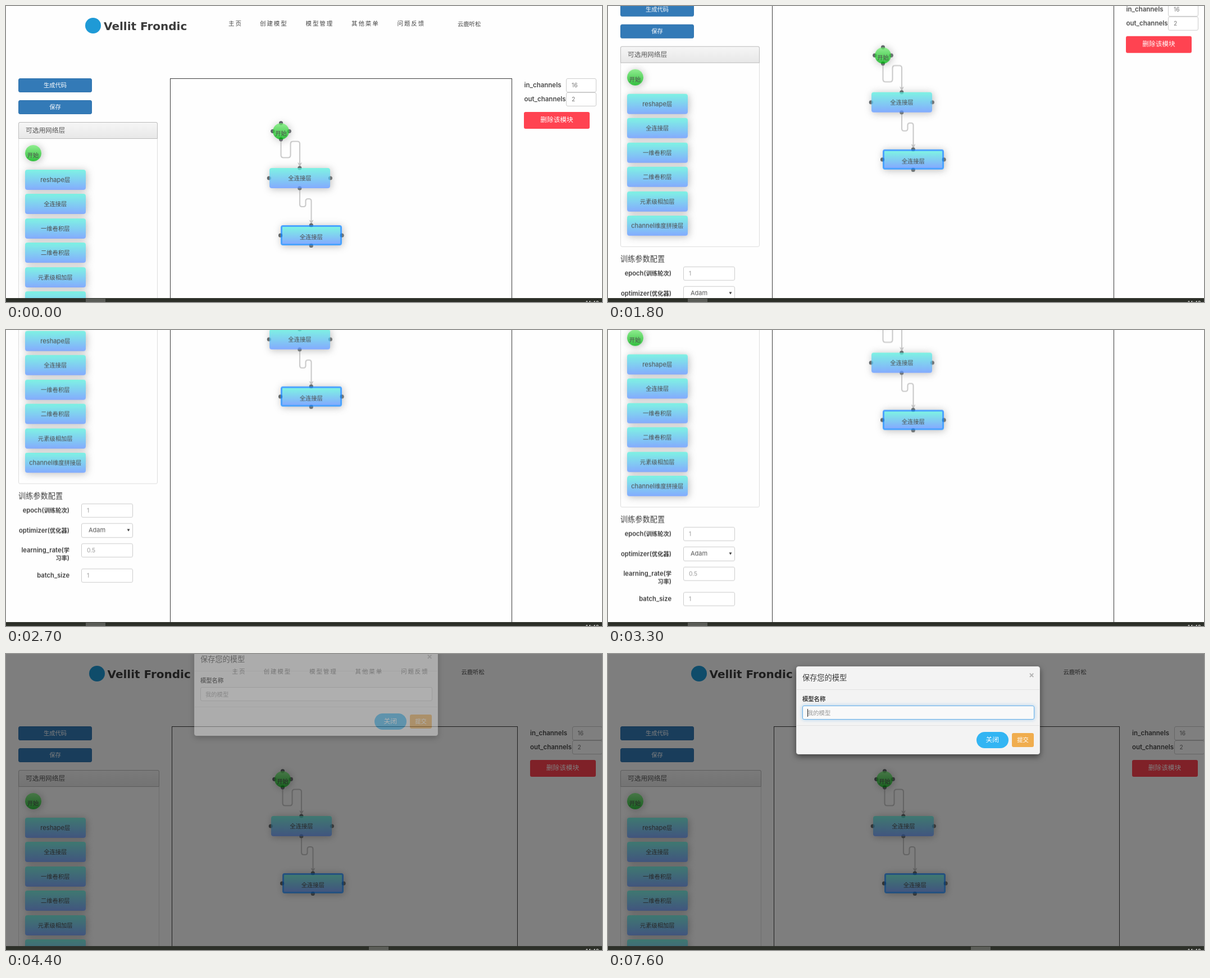
An HTML page for the animation above (8000 ms loop, 1061x528 px).

```html
<!DOCTYPE html>
<html lang="zh">
<head>
<meta charset="utf-8">
<title>Model editor</title>
<style>
html, body { margin: 0; width: 100%; height: 100%; overflow: hidden; background: #fdfdfd; }
#stage {
  --o: 0;
  position: absolute; left: 0; top: 0; width: 1061px; height: 528px; overflow: hidden;
  background: #fefefe; color: #3c3c3c;
  font: 10.3px/20px Inter, "Noto Sans CJK SC", "Noto Sans CJK", sans-serif;
}
#stage div, #stage svg { position: absolute; box-sizing: border-box; white-space: nowrap; }
i { font-style: normal; font-size: 11.2px; }
#stage, #page, #save, #shade, #modal, #name, #hint, #c1, #c2, #one, #two, #tab {
  animation: 8s step-end infinite;
}

/* page */
#stage { animation-name: reflow; }
#page { left: 0; top: 0; width: 1061px; height: 1000px; animation-name: scroll; }
#head { left: calc(var(--o) * 6.5px); top: 0; color: #484848; }
#brand { left: 174px; top: 26px; color: #3c3c3c; font: 900 20px/20px "DejaVu Sans", sans-serif; }
#logo { left: 141px; top: 21px; width: 28px; height: 28px; border-radius: 50%; background: #1f9ad6; }
.nav { top: 22px; font-size: 10.5px; letter-spacing: 1.9px; }
.btn { color: #fff; text-align: center; border-radius: 3px; }
.blue { left: 22px; width: 131px; height: 25px; line-height: 23px; background: #337ab7; border: 1px solid #3173ad; }
#save { top: 168px; animation-name: press; }
#panel { left: 22px; top: 207px; width: calc(248px + var(--o) * 3px); height: 357.5px; border: 1px solid #ddd; border-radius: 3px; }
#panel div {
  left: -1px; top: -1px; width: calc(100% + 2px); height: 30px; padding-left: 12px;
  font-size: 11.7px; line-height: 29px; color: #5a5a5a;
  background: linear-gradient(#f6f6f6, #e8e8e8); border: 1px solid #bbb; border-radius: 3px 3px 0 0;
}
.node, .start { text-align: center; opacity: .8; color: #222; box-shadow: 1.5px 1.5px 14px #aaa; }
.node {
  width: 108.5px; height: 36px; line-height: 36px; border-radius: 4px;
  background: linear-gradient(#5ff0dd, #6597ff);
}
.start {
  width: 29px; height: 29px; line-height: 37px; border-radius: 50%;
  background: linear-gradient(#74ea74, #00b010);
}
.left { left: 33.5px; }
.picked { border: 3.5px solid #1e8cff; line-height: 36px; }
#board { left: calc(292px + var(--o) * 3px); top: 128.5px; width: calc(609px + var(--o) * 7px); height: 900px; border: 1px solid #3c3c3c; }
#graph { left: calc(var(--o) * 3px); top: 0; }
#side { left: calc(var(--o) * 10.5px); top: 0; }
.lab { font-weight: 600; font-size: 11.2px; }
.lab span { font-size: 10.3px; }
.form { right: 948px; text-align: right; }
.side { left: 922.5px; font-size: 11.5px; color: #4a4a4a; }
.in {
  left: 134px; width: 91.5px; height: 25.5px; padding-left: 9px; line-height: 23.5px;
  color: #999; background: #fff; border: 1px solid #ccc; border-radius: 3px;
}
.num { left: 997px; width: 54px; color: #777; }
#del { left: 922px; top: 189px; width: 117px; height: 29.5px; line-height: 29.5px; font-size: 11.7px; background: #ff4351; }

/* dialog */
#shade { left: 0; top: 0; width: 1061px; height: 528px; background: #000; opacity: 0; animation-name: shade; }
#modal {
  left: 334.5px; top: 21.5px; width: 434.5px; height: 157.5px; opacity: 0; background: #f3f3f3;
  border: 1px solid #e2e2e2; border-radius: 4px; box-shadow: 0 4px 11px rgba(0,0,0,.5); animation-name: drop;
}
.rule { left: 0; width: 100%; height: 1px; background: #e2e2e2; }
#name {
  left: 10px; top: 69.5px; width: 413px; height: 25px; background: #f9f9f9;
  border: 1px solid #ccc; border-radius: 3px; animation-name: focus;
}
#hint { left: 8.5px; top: 1.5px; color: #999; animation-name: hint; }
.caret { top: 4.5px; width: 1px; height: 14px; background: #222; opacity: 0; }
#c1 { left: 8.5px; animation-name: caret1; }
#c2 { left: 16.5px; animation-name: caret2; }
.key { top: 1.5px; color: #555; opacity: 0; font-family: Roboto, sans-serif; font-size: 10.5px; }
#one { left: 6.5px; animation-name: one; }
#two { left: 10.7px; animation-name: two; }

/* task bar */
#bar { left: 0; top: 521px; width: 1061px; height: 7px; overflow: hidden; background: #2d3029; }
#tab { left: 0; top: 1px; width: 35px; height: 6px; background: #5b5d58; transform: translateX(141.5px); animation-name: tab; }
#clock { left: 1032px; top: 4px; color: #fff; font-size: 9px; line-height: 10px; }

@keyframes scroll {
  0% { transform: translateY(0); }
  10% { transform: translateY(-48px); }
  11.25% { transform: translateY(-72.6px); }
  15% { transform: translateY(-80px); }
  16.25% { transform: translateY(-122px); }
  17.5% { transform: translateY(-145.2px); }
  22.5% { transform: translateY(-135.3px); }
  23.75% { transform: translateY(-75px); }
  25% { transform: translateY(-26px); }
  26.25% { transform: translateY(-8px); }
  27.5% { transform: translateY(-68px); }
  28.75% { transform: translateY(-145.2px); }
  31.25% { transform: translateY(-180px); }
  32.5% { transform: translateY(-255px); }
  33.75% { transform: translateY(-290.4px); }
  36.25% { transform: translateY(-312px); }
  37.5% { transform: translateY(-345px); }
  38.75% { transform: translateY(-360px); }
  40% { transform: translateY(-325px); }
  41.25% { transform: translateY(-248.6px); }
  42.5% { transform: translateY(-165px); }
  43.75% { transform: translateY(-80px); }
  45% { transform: translateY(-20px); }
  46.25%, 100% { transform: translateY(0); }
}
@keyframes reflow { 0% { --o: 0; } 53.75%, 100% { --o: 1; } }
@keyframes press {
  0% { background: #337ab7; border-color: #3173ad; }
  48.75% { background: #286090; border-color: #204d74; }
  51.25% { background: #204d74; border-color: #2c66a4; }
  53.75%, 100% { background: #337ab7; border-color: #3173ad; }
}
@keyframes tab { 0% { transform: translateX(141.5px); } 51.25%, 100% { transform: translateX(646px); } }
@keyframes shade { 0% { opacity: 0; } 53.75% { opacity: .25; } 55%, 100% { opacity: .5; } }
@keyframes drop {
  0% { opacity: 0; transform: translateY(-39px); }
  55% { opacity: .4; transform: translateY(-33px); }
  56.25% { opacity: 1; transform: translateY(-18px); }
  57.5% { opacity: 1; transform: translateY(-5px); }
  58.75%, 100% { opacity: 1; transform: none; }
}
@keyframes focus {
  0% { border-color: #ccc; box-shadow: none; }
  66.25% { border-color: #aec4d4; box-shadow: 0 0 2px rgba(102,175,233,.3); }
  67.5%, 100% { border-color: #66afe9; box-shadow: 0 0 6px rgba(102,175,233,.6); }
}
@keyframes hint { 0% { opacity: 1; } 80% { opacity: 0; } 95%, 100% { opacity: 1; } }
@keyframes caret1 {
  0% { opacity: 0; } 66.25% { opacity: 1; } 72.5% { opacity: 0; }
  78.75% { opacity: 1; } 80% { opacity: 0; } 95%, 100% { opacity: 1; }
}
@keyframes caret2 { 0% { opacity: 0; } 83.75% { opacity: 1; } 88.75%, 100% { opacity: 0; } }
@keyframes one { 0% { opacity: 0; } 80% { opacity: 1; } 95%, 100% { opacity: 0; } }
@keyframes two { 0% { opacity: 0; } 83.75% { opacity: 1; } 92.5%, 100% { opacity: 0; } }
</style>
</head>
<body>
<div id="stage">
  <div id="page">
    <div id="head">
      <div id="logo"></div>
      <div id="brand">Vellit Frondic</div>
      <div class="nav" style="left:396px">主页</div>
      <div class="nav" style="left:452px">创建模型</div>
      <div class="nav" style="left:533.5px">模型管理</div>
      <div class="nav" style="left:615px">其他菜单</div>
      <div class="nav" style="left:696.5px">问题反馈</div>
      <div class="nav" style="left:804px;font-size:10.3px;letter-spacing:0">云鹿听松</div>
    </div>

    <div class="btn blue" style="top:129px">生成代码</div>
    <div class="btn blue" id="save">保存</div>
    <div id="panel"><div>可选用网络层</div></div>
    <div class="start left" style="top:248px">开始</div>
    <div class="node left" style="top:291.5px"><i>reshape</i>层</div>
    <div class="node left" style="top:335px">全连接层</div>
    <div class="node left" style="top:378.6px">一维卷积层</div>
    <div class="node left" style="top:422.2px">二维卷积层</div>
    <div class="node left" style="top:465.7px">元素级相加层</div>
    <div class="node left" style="top:509.3px"><i>channel</i>维度拼接层</div>

    <div style="left:22px;top:576px;font-size:13.2px">训练参数配置</div>
    <div class="lab form" style="top:602px">epoch(<span>训练轮次</span>)</div>
    <div class="in" style="top:599.8px">1</div>
    <div class="lab form" style="top:637.5px">optimizer(<span>优化器</span>)</div>
    <div class="in" style="top:635.3px;padding-left:12px;color:#555;font-size:11px">Adam</div>
    <svg style="left:215px;top:645px" width="6" height="5"><path d="M.5 .5h5l-2.5 4z" fill="#333"/></svg>
    <div class="lab form" style="top:672.5px">learning_rate(<span>学</span></div>
    <div class="lab form" style="top:687px"><span>习率</span>)</div>
    <div class="in" style="top:670.8px">0.5</div>
    <div class="lab form" style="top:718px">batch_size</div>
    <div class="in" style="top:715.8px">1</div>

    <div id="board"></div>
    <div id="graph">
      <svg style="left:0;top:0" width="700" height="500">
        <g fill="none" stroke="#cacaca" stroke-width="2.1">
          <path d="M489.5 238V266q0 4.5 4.5 4.5H502q4.5 0 4.5-4.5V246q0-4.5 4.5-4.5H518.5q4.5 0 4.5 4.5V286"/>
          <path d="M523 325V354q0 4 4 4H529.5q4 0 4-4V348q0-4 4-4H539.5q4 0 4 4V388"/>
        </g>
        <path d="M519 279l4 2 4-2-4 8zM539.5 381.5l4 2 4-2-4 8z" fill="#c4c4c4"/>
        <g fill="#4d5558" id="dots"></g>
      </svg>
      <div class="start" style="left:475px;top:208.7px">开始</div>
      <div class="node" style="left:468.7px;top:289px">全连接层</div>
      <div class="node picked" style="left:489px;top:391px">全连接层</div>
    </div>

    <div id="side">
      <div class="lab side" style="top:131px">in_channels</div>
      <div class="lab side" style="top:155.5px">out_channels</div>
      <div class="in num" style="top:128.7px">16</div>
      <div class="in num" style="top:153.5px">2</div>
      <div class="btn" id="del">删除该模块</div>
    </div>
  </div>

  <div id="shade"></div>
  <div id="modal">
    <div style="left:10.5px;top:9.5px;font-size:13.2px">保存您的模型</div>
    <div style="left:413.5px;top:5.5px;font-size:15px;font-weight:700;color:#b5b5b5">×</div>
    <div class="rule" style="top:40px"></div>
    <div style="left:10.5px;top:47.5px;font-weight:700">模型名称</div>
    <div id="name">
      <div id="hint">我的模型</div>
      <div class="key" id="one">1</div>
      <div class="key" id="two">2</div>
      <div class="caret" id="c1"></div>
      <div class="caret" id="c2"></div>
    </div>
    <div class="rule" style="top:104.5px"></div>
    <div class="btn" style="left:320px;top:116.5px;width:57.5px;height:29px;line-height:29px;border-radius:15px;font-size:11.7px;background:#33b5f3">关闭</div>
    <div class="btn" style="left:383.5px;top:118.5px;width:39px;height:25px;line-height:24px;background:#f0ad4e">提交</div>
  </div>

  <div id="bar"><div id="tab"></div><div id="clock">14:48</div></div>
</div>
<script>
// Four connection points around each block: centre x, centre y, half width, half height
const blocks = [[489.5, 223.3, 14.7, 14.5], [522.8, 307, 54.5, 18], [543.3, 409.2, 54.7, 18.2]];
document.getElementById("dots").innerHTML = blocks.map(([x, y, w, h]) =>
  [[0, -h], [w, 0], [0, h], [-w, 0]].map(([dx, dy]) =>
    `<circle cx="${x + dx}" cy="${y + dy}" r="3.6"/>`).join("")).join("");
</script>
</body>
</html>
```
